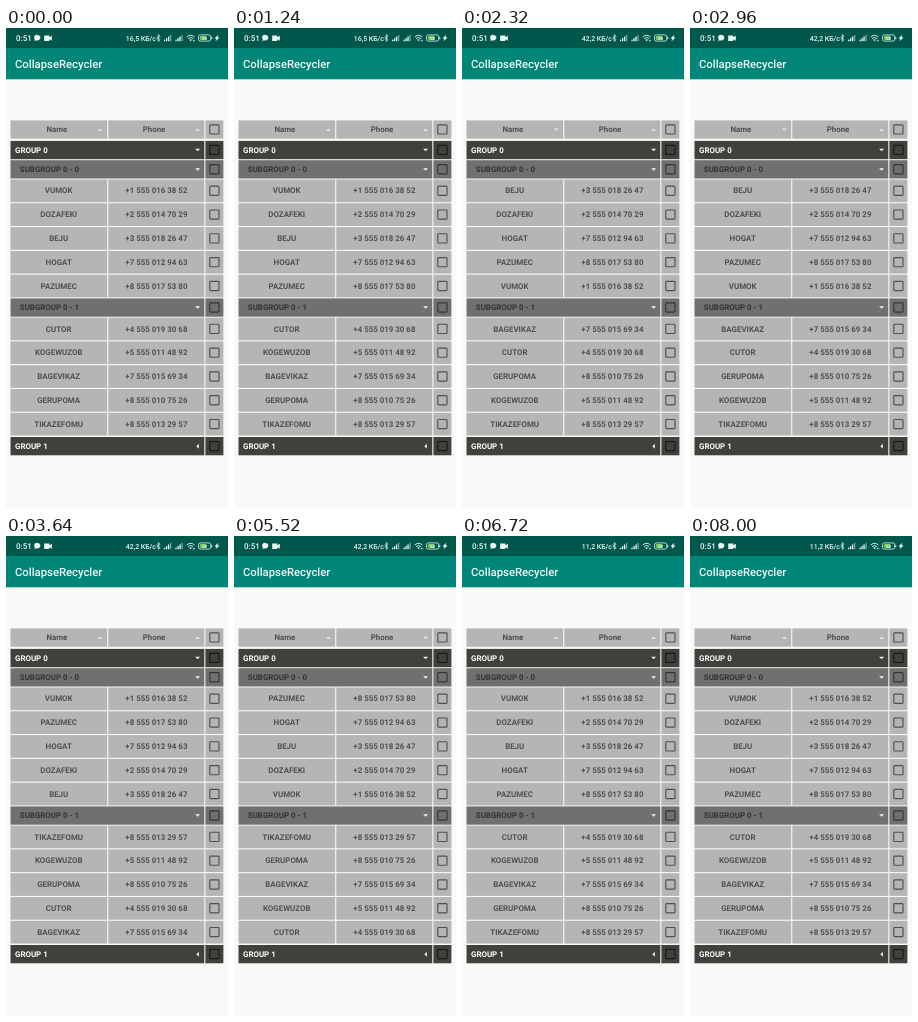
These frames come from a looping animation (222x480 px, 8160 ms). An HTML page:

```html
<!DOCTYPE html>
<html lang="en">
<head>
<meta charset="utf-8">
<title>CollapseRecycler</title>
<style>
  html, body { margin: 0; width: 100%; height: 100%; overflow: hidden; background: #f8faf8; }
  svg { display: block; width: 222px; height: 480px; }
  text { font: 700 7.91px Roboto, "Open Sans", sans-serif; text-rendering: geometricPrecision; }
  .title { font-size: 11.3px; font-weight: 500; }
  .clock { font-size: 8px; font-weight: 500; }
  .speed { font-size: 6.9px; font-weight: 500; }
  .charge { font-size: 4.6px; font-weight: 500; }
</style>
</head>
<body>
<svg id="stage" viewBox="0 0 222 480">
  <rect width="222" height="480" fill="#f8faf8"/>
  <rect width="222" height="51.3" fill="#008577"/>
  <rect width="222" height="20" fill="#00574b"/>
  <g fill="#f1f7f5">
    <text class="clock" x="10" y="13">0:51</text>
    <path d="M31.4 6.9a3.2 2.8 0 1 1-1.4 5.4l-1.7 1 .5-2.1a2.9 2.6 0 0 1 2.6-4.3z"/>
    <path d="M38.2 7.4h5.1v1.8l2.5-1.5v5l-2.5-1.5v1.8h-5.1z"/>
    <text class="speed" id="speed" x="119.8" y="12.7"></text>
    <path d="M150.8 8.4l3.2 3.4-1.7 1.6V6.6l1.7 1.6-3.2 3.4" fill="none" stroke="#f1f7f5" stroke-width=".75"/>
    <g id="signals"></g>
    <g fill="none" stroke="#f1f7f5" stroke-width=".9">
      <path d="M180.8 8.9q3.8-3.2 7.6 0M182.1 10.5q2.5-2 5 0"/>
    </g>
    <path d="M183.3 11.8q1.3-1 2.6 0l-1.3 1.5z"/>
    <path d="M186.6 13.2h2.6l-1.3-2z" fill-opacity=".8"/>
    <rect x="192.5" y="6.9" width="12.2" height="6.2" rx="1.8" fill="none" stroke="#e4efeb" stroke-width=".8"/>
    <rect x="193.8" y="8.1" width="6.4" height="3.8" rx=".8" fill="#72c94e"/>
    <text class="charge" x="198.6" y="11.6" text-anchor="middle">58</text>
    <rect x="205.3" y="8.8" width=".9" height="2.5"/>
    <path d="M212.3 6.8l-3.9 3.6h2.1l-1 2.8 4.2-3.8h-2.2z"/>
    <text class="title" x="9" y="40">CollapseRecycler</text>
  </g>
</svg>
<script>
const LOOP = 8160;
const ROW = 23.8;
const BAR = 18.3;
const stage = document.getElementById('stage');
const speed = document.getElementById('speed');
const LIGHT = '#b6b5b3', MID = '#72706e', DARK = '#40403c', INK = '#51504e';

function add(tag, attrs, parent = stage) {
  const el = document.createElementNS('http://www.w3.org/2000/svg', tag);
  for (const key in attrs) el.setAttribute(key, attrs[key]);
  parent.append(el);
  return el;
}

const box = (x, y, width, height, fill) => add('rect', { x, y, width, height, fill });

function label(str, x, y, fill, anchor = 'middle') {
  const el = add('text', { x, y, fill, 'text-anchor': anchor });
  el.textContent = str;
  return el;
}

function arrow(x, y, angle, fill) {
  return add('path', {
    d: 'M-2.5 -1.2h5L0 1.3z', fill,
    transform: `translate(${x} ${y}) rotate(${angle})`
  });
}

function checkCell(y, h, fill, stroke) {
  box(199.4, y, 18, h, fill);
  add('rect', {
    x: 203.8, y: y + h / 2 - 4.7, width: 9.2, height: 9.2, rx: .8,
    fill: 'none', stroke, 'stroke-width': 1.15
  });
}

function bar(y, fill, str, x, ink, angle, check) {
  box(4.5, y, 193.8, BAR, fill);
  label(str, x, y + BAR / 2 + 2.7, ink, 'start');
  arrow(191.6, y + BAR / 2, angle, '#f2f2f0');
  checkCell(y, BAR, fill, check);
}

function cells(y, h) {
  box(4.5, y, 96.7, h, LIGHT);
  box(102.3, y, 96, h, LIGHT);
  checkCell(y, h, LIGHT, INK);
}

// Signal strength bars
for (const x of [158, 169.4]) {
  for (let i = 0; i < 4; i++) {
    const height = 1.5 + i * 1.6;
    add('rect', {
      x: x + i * 2, y: 13.2 - height, width: 1.3, height,
      'fill-opacity': i < 3 ? 1 : .5
    }, document.getElementById('signals'));
  }
}

cells(92.4, BAR);
label('Name', 50.9, 104.2, INK);
label('Phone', 148, 104.2, INK);
const arrows = [94.3, 191.6].map(x => arrow(x, 101.7, 0, '#e6e5e3'));

bar(112.9, DARK, 'GROUP 0', 9, '#ffffff', 0, '#171716');
bar(132.2, MID, 'SUBGROUP 0 - 0', 13.8, '#343331', 0, '#353432');
bar(270.4, MID, 'SUBGROUP 0 - 1', 13.8, '#343331', 0, '#353432');
bar(409, DARK, 'GROUP 1', 9, '#ffffff', 90, '#171716');

const groups = [
  { top: 151.5, rows: [
    ['VUMOK', '+1 555 016 38 52'],
    ['DOZAFEKI', '+2 555 014 70 29'],
    ['BEJU', '+3 555 018 26 47'],
    ['HOGAT', '+7 555 012 94 63'],
    ['PAZUMEC', '+8 555 017 53 80']
  ] },
  { top: 289.6, rows: [
    ['CUTOR', '+4 555 019 30 68'],
    ['KOGEWUZOB', '+5 555 011 48 92'],
    ['BAGEVIKAZ', '+7 555 015 69 34'],
    ['GERUPOMA', '+8 555 010 75 26'],
    ['TIKAZEFOMU', '+8 555 013 29 57']
  ] }
];

for (const group of groups) {
  group.slots = group.rows.map((_, i) => {
    const y = group.top + i * ROW;
    cells(y, 22.7);
    return [label('', 52.7, y + 13.9, INK), label('', 150.4, y + 13.9, INK)];
  });
}

// start time, sort column, direction, header arrow angles
const sorts = [
  [0, 1, 1, [180, 180]],
  [1440, 0, 1, [0, 180]],
  [3520, 0, -1, [180, 180]],
  [5520, 1, -1, [180, 0]],
  [6720, 1, 1, [180, 180]]
];
const speeds = [[0, '16,5'], [2320, '42,2'], [6360, '11,2']];
const at = (steps, t) => steps.findLast(step => step[0] <= t);

function sortRows([, col, dir, angles]) {
  for (const { rows, slots } of groups) {
    const order = [...rows].sort((a, b) => dir * (a[col] < b[col] ? -1 : 1));
    slots.forEach((slot, i) => slot.forEach((el, c) => { el.textContent = order[i][c]; }));
  }
  arrows.forEach((el, i) => {
    el.setAttribute('transform', `translate(${i ? 191.6 : 94.3} 101.7) rotate(${angles[i]})`);
  });
}

let current;
function draw(now) {
  const t = now % LOOP;
  const step = at(sorts, t);
  if (step !== current) sortRows(current = step);
  const rate = at(speeds, t)[1] + ' КБ/с';
  if (speed.textContent !== rate) speed.textContent = rate;
}

const begin = performance.now();
function tick() {
  draw(performance.now() - begin);
  requestAnimationFrame(tick);
}
tick();
</script>
</body>
</html>
```
